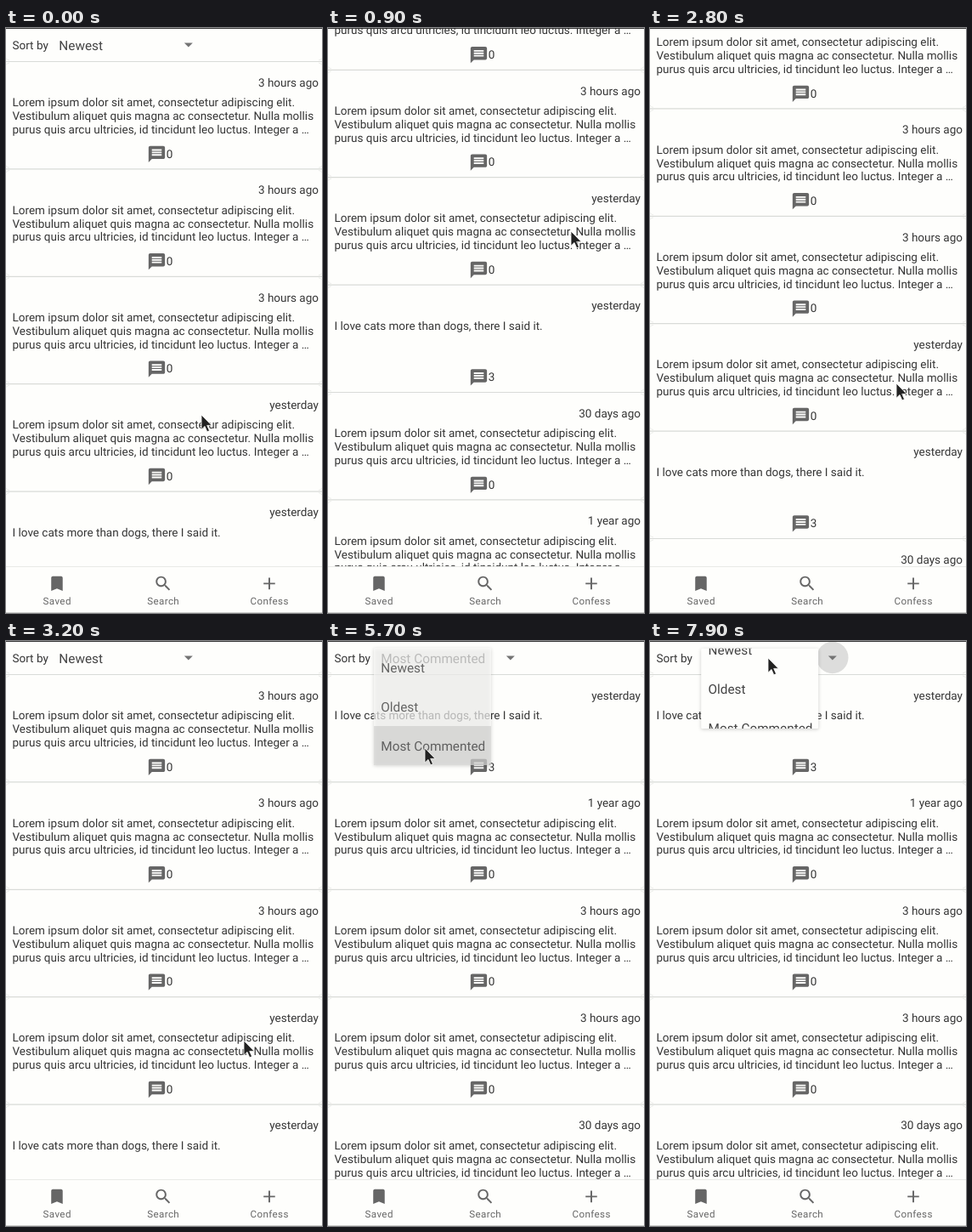
These frames come from a looping animation (372x688 px, 8000 ms). An HTML page:

```html
<!DOCTYPE html>
<html lang="en">
<head>
<meta charset="utf-8">
<title>Confessions list</title>
<style>
  html, body { margin: 0; width: 100%; height: 100%; overflow: hidden; background: #fefefc; }
  svg { display: block; width: 100%; height: 100%; }
  text { font: 13.5px Roboto, sans-serif; fill: #353535; text-rendering: geometricPrecision; white-space: pre; }
  .pick { font-size: 15.35px; fill: #444; }
  .tab { font-size: 11.58px; letter-spacing: .38px; fill: #666; text-anchor: middle; }
  .icon { fill: #666; }
</style>
</head>
<body>
<svg id="stage" viewBox="0 0 372 688">
  <defs>
    <filter id="blur" x="-20%" y="-20%" width="140%" height="140%"><feGaussianBlur stdDeviation="2.2"/></filter>
    <clipPath id="reveal"><rect class="panel" x="54" width="138"/></clipPath>
  </defs>
  <rect width="372" height="688" fill="#fefefc"/>
  <g id="page">
    <text x="7.5" y="25.2">Sort by</text>
    <text id="picked" class="pick" x="62.3" y="25.6"></text>
    <circle id="ripple" cx="214.8" cy="19.5" r="0"/>
    <path d="M209.8 17.4h10l-5 5z" fill="#747474"/>
    <g id="rows"></g>
  </g>
  <g id="tabs">
    <rect y="633" width="372" height="55" fill="#fefefc"/>
    <path d="M0 633.5H372" stroke="#e9eae7"/>
    <path d="M0 687.5H372" stroke="#cfd0cd"/>
  </g>
  <g id="menu">
    <rect id="shade" class="panel" x="54" width="138" filter="url(#blur)" transform="translate(0 1)"/>
    <rect id="sheet" class="panel" x="54" width="138" rx="1.5" fill="#fefefc"/>
    <g id="options" clip-path="url(#reveal)">
      <rect id="press" x="54" y="100" width="138" height="46" opacity="0"/>
    </g>
  </g>
  <path d="M0 .5H372" stroke="#3a3a3a"/>
  <path id="cursor" d="M0 0V17.2L4 13.4 6.8 19.8 9.5 18.6 6.7 12.4H12.2Z" fill="#222" stroke="#fefefc" stroke-width=".8"/>
</svg>
<script>
const LOOP = 8000, STEP = 100, PITCH = 126.4;
const $ = id => document.getElementById(id);

function add(parent, tag, attrs, label) {
  const el = document.createElementNS('http://www.w3.org/2000/svg', tag);
  for (const k in attrs) el.setAttribute(k, attrs[k]);
  if (label) el.textContent = label;
  return parent.appendChild(el);
}
function set(el, attrs) {
  for (const k in attrs) el.setAttribute(k, attrs[k]);
}

const LOREM = [
  'Lorem ipsum dolor sit amet, consectetur adipiscing elit.',
  'Vestibulum aliquet quis magna ac consectetur. Nulla mollis',
  'purus quis arcu ultricies, id tincidunt leo luctus. Integer a …'
];
const CATS = ['I love cats more than dogs, there I said it.'];
const BUBBLE = 'M20 2H4c-1.1 0-1.99.9-1.99 2L2 22l4-4h14c1.1 0 2-.9 2-2V4c0-1.1-.9-2-2-2zm-2 12H6v-2h12v2zm0-3H6V9h12v2zm0-3H6V6h12v2z';

const post = (age, lines = LOREM, replies = 0) => ({ age, lines, replies });
const recent = post('3 hours ago'), day = post('yesterday'), month = post('30 days ago');
const year = post('1 year ago'), cats = post('yesterday', CATS, 3);

function buildList(posts) {
  const list = add($('rows'), 'g', {});
  posts.forEach((p, i) => {
    const row = add(list, 'g', { transform: `translate(0 ${39.5 + i * PITCH})` });
    add(row, 'path', { d: 'M0 0H372', stroke: '#d9dbd8', 'stroke-width': 1.2 });
    add(row, 'path', { d: 'M0 4Q1 2 4 1.5M372 4Q371 2 368 1.5M0-4Q1-2 4-1.5M372-4Q371-2 368-1.5', fill: 'none', stroke: '#ecedea' });
    add(row, 'text', { x: 368, y: 29.4, 'text-anchor': 'end' }, p.age);
    p.lines.forEach((s, n) => add(row, 'text', { x: 7.5, y: 52.8 + n * 15.85 }, s));
    add(row, 'path', { class: 'icon', d: BUBBLE, transform: 'translate(165.9 97.2) scale(.965)' });
    add(row, 'text', { x: 188.8, y: 113 }, String(p.replies));
  });
  return list;
}
const newest = buildList([recent, recent, recent, day, cats, month, year]);
const commented = buildList([cats, year, recent, recent, month, recent, day]);

[
  ['Saved', 60, 'M17 3H7c-1.1 0-1.99.9-1.99 2L5 21l7-3 7 3V5c0-1.1-.9-2-2-2z'],
  ['Search', 185, 'M15.5 14h-.79l-.28-.27C15.41 12.59 16 11.11 16 9.5 16 5.91 13.09 3 9.5 3S3 5.91 3 9.5 5.91 16 9.5 16c1.61 0 3.09-.59 4.23-1.57l.27.28v.79l5 4.99L20.49 19l-4.99-5zm-6 0C7.01 14 5 11.99 5 9.5S7.01 5 9.5 5 14 7.01 14 9.5 11.99 14 9.5 14z'],
  ['Confess', 310, 'M19 13h-6v6h-2v-6H5v-2h6V5h2v6h6v2z']
].forEach(([name, x, d]) => {
  add($('tabs'), 'path', { class: 'icon', d, transform: `translate(${x - 11.6} 641.8) scale(.965)` });
  add($('tabs'), 'text', { class: 'tab', x: x + .2, y: 678.2 }, name);
});

const labels = ['Newest', 'Oldest', 'Most Commented'].map((s, i) =>
  add($('options'), 'text', { class: 'pick', x: 62.3, y: 36.9 + i * 46 }, s));
const panels = document.querySelectorAll('.panel');

// Keys are [time, value, ...]; values move linearly between them.
function track(keys, t) {
  let i = 0;
  while (i < keys.length - 1 && keys[i + 1][0] <= t) i++;
  const a = keys[i], b = keys[i + 1];
  if (!b || t <= a[0]) return a.slice(1);
  const k = (t - a[0]) / (b[0] - a[0]);
  return a.slice(1).map((v, n) => v + (b[n + 1] - v) * k);
}

const POINTER = [
  [100, 230, 455], [300, 244, 494], [500, 244, 494], [600, 246, 484], [900, 286, 239], [1100, 304, 202],
  [1300, 309, 195], [1400, 309, 195], [1800, 317, 349], [1900, 317, 349], [2300, 288, 190], [2400, 288, 205],
  [2600, 289, 300], [2800, 290, 418], [3000, 290, 490], [3200, 280, 470], [3700, 183, 143], [3800, 152, 36],
  [3900, 141, 50], [4000, 141, 50], [4200, 121, 11], [4700, 121, 11], [5000, 99, 106], [5100, 99, 106],
  [5300, 114, 126], [6200, 114, 126], [6400, 185, 190], [6500, 185, 190], [6700, 246, 281], [6800, 145, 109],
  [6900, 174, 179], [7000, 174, 179], [7300, 121, 62], [7400, 139, 42], [7500, 139, 42], [7600, 139, 20]
];
const SCROLL = [
  [600, 0], [900, 243], [1100, 281], [1300, 291], [2300, 291], [2400, 285], [2600, 190], [2800, 71], [3000, 0]
];
// Both relative to the moment the picker is tapped.
const RIPPLE = [[0, 0, .13], [300, 18.7, .13], [400, 18.7, .1], [600, 18.7, 0]];
const SHIFT = [[300, .365], [400, .1], [500, .02], [600, 0]];
const FADE = [[5600, 1], [5700, .66], [5800, .25], [5900, 0]];

function drawMenu(t, since) {
  const shown = since >= 300 && (t < 5900 || t >= 7600);
  $('menu').style.display = shown ? '' : 'none';
  if (!shown) return;
  const [p] = track(SHIFT, since);
  const [alpha] = t < 7600 ? track(FADE, t) : [1];
  const inset = 60 * p;
  $('menu').setAttribute('transform', `translate(${17 * p} ${-58 * p})`);
  panels.forEach(el => set(el, { y: 8 + inset, height: 138 - 2 * inset }));
  $('shade').setAttribute('opacity', .2 * Math.sqrt(alpha));
  $('sheet').setAttribute('opacity', alpha);
  $('press').setAttribute('opacity', t >= 5600 && t < 5900 ? .12 * Math.sqrt(alpha) : 0);
  labels.forEach(el => el.setAttribute('opacity', Math.sqrt(alpha)));
}

function draw(t) {
  const sorted = t > 5600;
  const [x, y] = track(POINTER, t);
  const since = t >= 7600 ? t - 7600 : t - 4400;
  const [r, opacity] = track(RIPPLE, since);
  $('page').setAttribute('transform', `translate(0 ${-track(SCROLL, t)[0]})`);
  $('cursor').setAttribute('transform', `translate(${x} ${y})`);
  $('picked').textContent = sorted ? 'Most Commented' : 'Newest';
  newest.style.display = sorted ? 'none' : '';
  commented.style.display = sorted ? '' : 'none';
  set($('ripple'), { r, opacity });
  drawMenu(t, since);
}

// The screen refreshes ten times a second.
const start = performance.now();
function tick() {
  const t = (performance.now() - start) % LOOP;
  draw(Math.floor(t / STEP) * STEP);
  requestAnimationFrame(tick);
}
tick();
</script>
</body>
</html>
```
